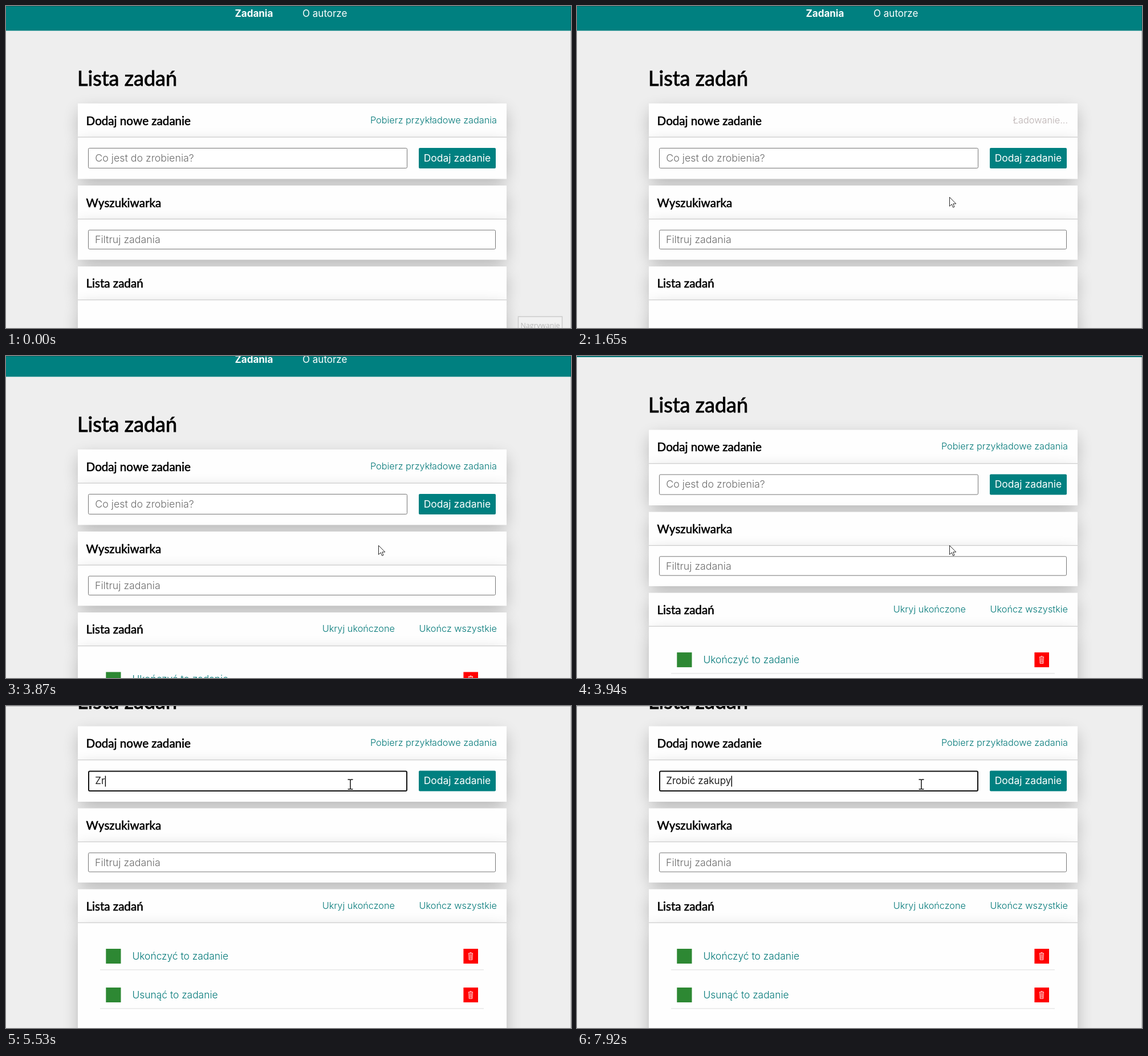
Write an HTML page that moves like this. It is 991x565 px and loops after 8 s.

```html
<!DOCTYPE html>
<html lang="pl">
<head>
<meta charset="utf-8">
<title>Lista zadań</title>
<style>
html, body { margin: 0; width: 100%; height: 100%; overflow: hidden; background: #eee; }
svg { display: block; width: 100%; height: 100%; }
text { font: 17px Inter, "Open Sans", sans-serif; white-space: pre; }
.h1, .h2 { font-family: Lato, sans-serif; font-kerning: none; stroke: #000; }
.h1 { font-size: 36px; stroke-width: .9px; }
.h2 { font-size: 20.6px; stroke-width: .6px; }
.bold { font-weight: 700; }
.white { fill: #fff; }
.link { font-size: 16.3px; font-weight: 300; fill: #007878; }
.task { font-size: 17.4px; }
.end { text-anchor: end; }
.middle { text-anchor: middle; }
.hint { font-size: 17.8px; font-weight: 300; fill: #6c6c6c; }
.field { fill: #fff; stroke: #767676; }
.note { font: 12.5px "Open Sans", sans-serif; fill: #b8b8b8; }
</style>
</head>
<body>
<svg id="stage" viewBox="0 0 991 565" preserveAspectRatio="none">
  <defs>
    <filter id="blur" x="-20%" y="-200%" width="140%" height="500%">
      <feGaussianBlur stdDeviation="15"/>
    </filter>
  </defs>
  <rect width="991" height="565" fill="#eee"/>
  <g id="page">
    <rect width="991" height="43.4" fill="#008080"/>
    <text class="white bold" x="401.5" y="19">Zadania</text>
    <text class="white" x="520" y="19">O autorze</text>
    <g id="cards"></g>
    <text class="h1" x="125" y="140">Lista zadań</text>
    <text class="h2" x="140.5" y="208.5">Dodaj nowe zadanie</text>
    <text class="h2" x="140.5" y="352.5">Wyszukiwarka</text>
    <text class="h2" x="140.5" y="494">Lista zadań</text>
    <text class="link end" id="fetch" x="861" y="205.5"></text>
    <rect class="field" id="entry" x="144.5" y="249.5" width="559" height="35" rx="2"/>
    <text id="typed" x="156.3" y="272.7"></text>
    <rect id="caret" y="258" width="1.4" height="19"/>
    <rect x="724" y="249" width="135" height="36" rx="2" fill="#008080"/>
    <text class="white middle" x="791.5" y="272.7" style="font-size:17.5px">Dodaj zadanie</text>
    <rect class="field" x="144.5" y="393.2" width="714" height="33.3" rx="2"/>
    <text class="hint" x="156" y="416">Filtruj zadania</text>
    <g id="tasks">
      <text class="link end" x="682" y="491">Ukryj ukończone</text>
      <text class="link end" x="861" y="491">Ukończ wszystkie</text>
    </g>
  </g>
  <path d="M0 .5H990.5V565" fill="none" stroke="#000" stroke-opacity=".2"/>
  <g id="note">
    <rect x="898.5" y="545" width="77" height="30" fill="#f1f1f1" stroke="#ccc" stroke-width="1.5"/>
    <text class="note middle" x="937" y="564.5">Nagrywanie</text>
  </g>
  <g id="cursor">
    <path id="arrow" d="M.5 .5V16.4L4.2 12.9L6.6 18.4L9 17.4L6.7 12H11.8Z" fill="#fff" stroke="#111" stroke-width=".9"/>
    <path id="beam" d="M-4.5 -8.5H-1.2L0 -7.6L1.2 -8.5H4.5M0 -7.6V7.6M-4.5 8.5H-1.2L0 7.6L1.2 8.5H4.5" fill="none" stroke="#111" stroke-width="1.5"/>
    <path id="hand" d="M-1.5 1Q0 -1 1.5 1V7L9 8.5Q11 9 10.5 12L9 19H0L-5.5 11.5Q-5 9 -1.5 11.5Z" fill="#fff" stroke="#111" stroke-width=".9"/>
  </g>
</svg>
<script>
const LOOP = 8000, TEAL = '#007878';
const $ = id => document.getElementById(id);

function add(parent, tag, attrs, label) {
  const el = document.createElementNS('http://www.w3.org/2000/svg', tag);
  for (const k in attrs) el.setAttribute(k, attrs[k]);
  if (label) el.textContent = label;
  parent.appendChild(el);
  return el;
}

function panel(y, height) {
  add($('cards'), 'rect', { x: 130, y: y + 14, width: 744, height: height - 11, opacity: .29, filter: 'url(#blur)' });
  add($('cards'), 'rect', { x: 126, y, width: 752, height, fill: '#fefefe' });
}

function card(top, split, bottom) {
  panel(top, split - top);
  panel(split, bottom - split);
  add($('cards'), 'rect', { x: 126, y: split - .5, width: 752, height: 1.2, fill: '#ccc' });
}

function task(y, label) {
  const g = add($('tasks'), 'g', { transform: `translate(0 ${y})` });
  add(g, 'rect', { x: 175.3, width: 26.2, height: 26, fill: '#2d8833' });
  add(g, 'text', { class: 'link task', x: 221.5, y: 18.8 }, label);
  add(g, 'rect', { x: 802.4, width: 25.6, height: 26, fill: '#f00' });
  add(g, 'path', {
    d: 'M-4 -5H4M-1.5 -6.3H1.5M-3.3 -5L-2.8 6.3H2.8L3.3 -5M-1.1 -3.5V5M1.1 -3.5V5',
    transform: 'translate(815 13)', fill: 'none', stroke: '#fff', 'stroke-width': .9
  });
  add(g, 'rect', { x: 165, y: 36.4, width: 673, height: 1, fill: '#ddd' });
}

card(171, 230, 303.5);
card(315, 373.8, 445.3);
card(457, 515.6, 728);
task(561.5, 'Ukończyć to zadanie');
task(629.5, 'Usunąć to zadanie');

const scrolls = [[0, 0], [3870, 7], [3940, 41.4], [4010, 100], [4080, 135.5]];
const typing = [[0, 0], [5070, 1], [5530, 2], [5730, 3], [5860, 4], [6020, 5], [6260, 6], [7120, 7],
  [7260, 8], [7330, 9], [7390, 10], [7590, 11], [7860, 12], [7920, 13]];
const path = [[70, 815, 575], [530, 690, 199], [1060, 690, 199], [1650, 653, 335], [2439, 653, 335],
  [2440, 653, 332], [4140, 653, 332], [4610, 603, 274], [4870, 604, 137.5]];

const held = (keys, t) => keys.filter(k => k[0] <= t).pop()[1];

function along(keys, t) {
  const i = keys.findIndex(k => k[0] > t);
  if (i < 0) return keys[keys.length - 1].slice(1);
  if (i === 0) return keys[0].slice(1);
  const a = keys[i - 1], b = keys[i];
  const p = (t - a[0]) / (b[0] - a[0]), e = p * p * (3 - 2 * p);
  return [1, 2].map(n => a[n] + (b[n] - a[n]) * e);
}

const show = (id, on) => $(id).setAttribute('visibility', on ? 'visible' : 'hidden');

function set(id, attrs) {
  for (const k in attrs) $(id).setAttribute(k, attrs[k]);
}

function draw(t) {
  const scroll = held(scrolls, t);
  const [x, y] = along(path, t);
  const loading = t >= 1060 && t < 3120;
  const focus = t >= 4870;

  set('page', { transform: `translate(0 ${-scroll})` });
  set('note', { opacity: Math.max(0, 1 - Math.max(0, t - 60) / 200) });

  // cursor
  const overLink = t < 1060 && y < 206;
  const overField = t > 4200 && (y < 150 || y > 257 && y < 291);
  set('cursor', { transform: `translate(${x} ${y})` });
  show('cursor', t >= 70);
  $('arrow').style.display = overLink || overField ? 'none' : '';
  $('beam').style.display = overField ? '' : 'none';
  $('hand').style.display = overLink ? '' : 'none';

  // download link
  $('fetch').textContent = loading ? 'Ładowanie...' : 'Pobierz przykładowe zadania';
  $('fetch').style.fill = loading ? '#b9afaf' : overLink ? '#00a6a6' : TEAL;
  show('tasks', t >= 3120);

  // entry field
  const count = held(typing, t);
  $('typed').textContent = count ? 'Zrobić zakupy'.slice(0, count) : 'Co jest do zrobienia?';
  $('typed').setAttribute('class', count ? '' : 'hint');
  $('typed').style.fill = count ? '#222' : '';
  $('entry').style.stroke = focus ? '#101010' : '';
  $('entry').style.strokeWidth = focus ? 2 : 1;
  set('entry', focus
    ? { x: 145, y: 250, width: 558, height: 34.4 }
    : { x: 144.5, y: 249.5, width: 559, height: 35 });
  set('caret', { x: 156.6 + (count ? $('typed').getComputedTextLength() : 0) });
  show('caret', focus && !(t >= 6860 && t < 7120));
}

const start = performance.now();
function tick() {
  draw((performance.now() - start) % LOOP);
  requestAnimationFrame(tick);
}
tick();
</script>
</body>
</html>
```
